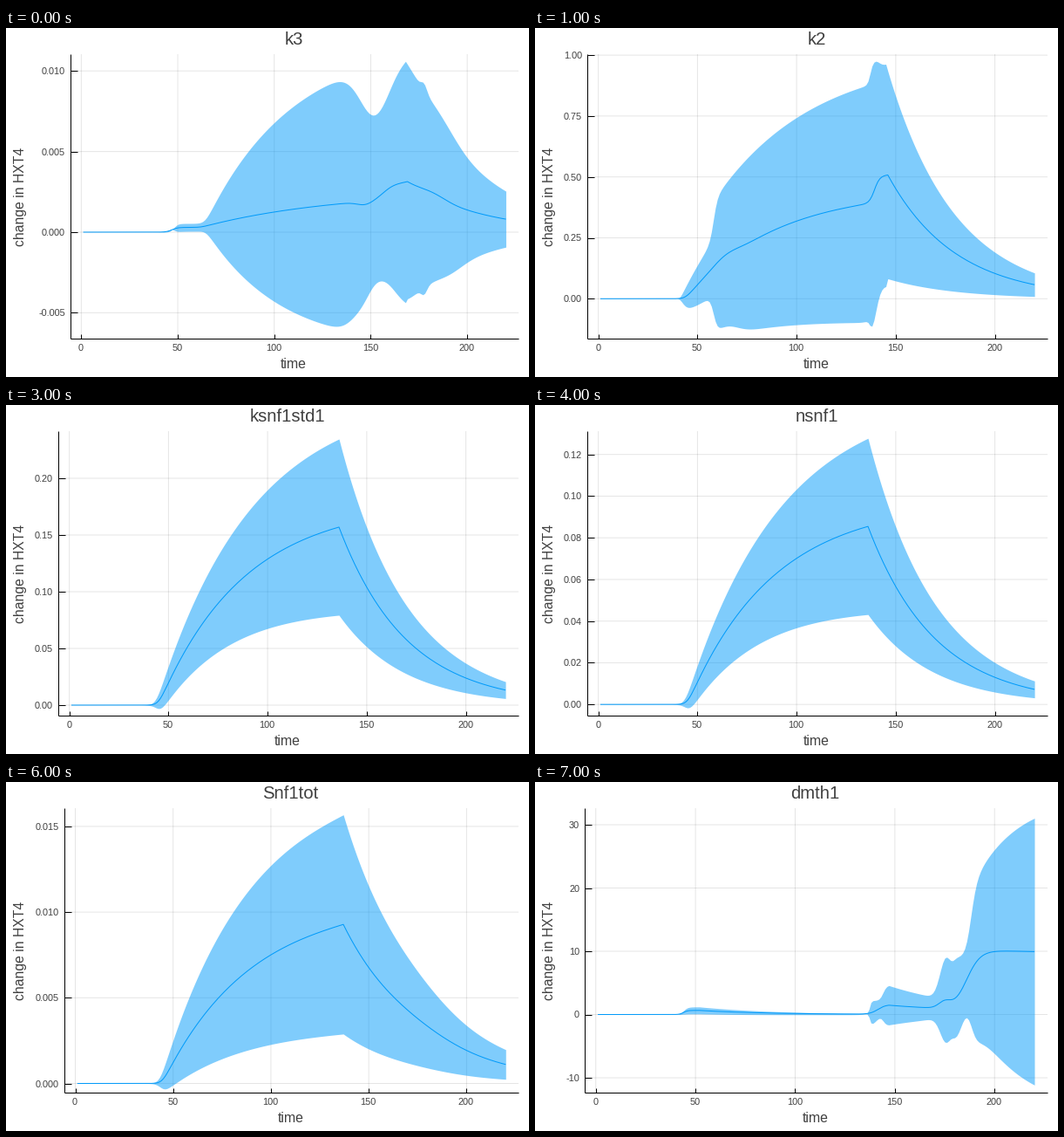
These frames come from a looping animation (600x400 px, 8 s). A matplotlib script:

```python
import numpy as np
import matplotlib.pyplot as plt
from matplotlib.animation import FuncAnimation

W, H, DPI = 600, 400, 100
RIGHT, TOP, BOTTOM = 588, 30, 356
T = np.arange(1, 221)
T_MIN, T_SPAN = -5.57, 232.14
BLUE, INK = "#009afa", "#404040"
PX = 72 / DPI

plt.rcParams["font.family"] = "Liberation Sans"
plt.rcParams["axes.unicode_minus"] = False


# Building blocks: heights in pixels above the zero line, one per time unit.

def rise(amp, start, tau, soft=1.3):
    """Saturating growth with a soft onset."""
    lag = soft * np.logaddexp(0, (T - start) / soft)
    return amp * (1 - np.exp(-lag / tau))


def step(amp, center, width):
    return amp / (1 + np.exp(np.clip((center - T) / width, -50, 50)))


def bump(amp, center, width):
    return amp * np.exp(-((T - center) / width) ** 2 / 2)


def fall(y, peak, tau):
    """Follow y up to the peak time, then decay exponentially."""
    tail = np.exp(-np.maximum(T - peak, 0) / tau)
    return y[np.minimum(T, peak) - 1] * tail


def panel(name, left, zero, gap, marks, unit, fmt, mid, top):
    ticks = [(zero - k * gap, format(k * unit, fmt)) for k in marks]
    return dict(name=name, left=left, ticks=ticks, mid=zero - mid, top=zero - top)


PULSE = (fall(rise(232, 45, 43), 136, 34), fall(rise(357, 43.5, 48), 136, 34.6))

K3 = (
    fall(step(5.5, 47, 1.5) + rise(42, 62, 70) + step(19, 157, 3), 169, 38)
    + bump(-4, 147, 4) + bump(5, 182, 7),
    fall(step(10, 48, 1) + rise(210, 64, 45), 168, 36)
    + bump(-56, 152, 7.5) + bump(14, 185, 9) + bump(8, 177.5, 1.5),
)
K2 = (
    fall(rise(125, 44, 45) + bump(5, 64, 6) + step(30, 139.3, 1.3), 146, 34),
    fall(rise(235, 41, 50, 0.5) + step(45, 58, 1) + step(18, 137, 0.6), 145, 34)
    + bump(7, 139.5, 2),
)
SNF1TOT = (
    fall(rise(208, 44.5, 45), 137, 39) + bump(6, 172, 18),
    fall(rise(352, 43, 46), 137, 40) + bump(10, 172, 18),
)
DMTH1 = (
    fall(step(4.7, 44, 1), 52, 35) + fall(step(11, 141.5, 2), 147, 60)
    + bump(7, 175, 3) + step(69, 186, 3.5),
    fall(step(8.7, 44, 1), 52, 40)
    + fall(step(15, 137.3, 0.4) + step(18, 144, 0.9), 147, 45)
    + bump(46, 175.5, 3) + step(50, 179.3, 1.2) + step(72, 188, 1.5)
    + rise(125, 186, 23),
)

PANELS = [
    panel("k3", 74, 234, 92.4, range(-1, 3), 0.005, ".3f", *K3),
    panel("k2", 60, 310.3, 69.8, range(5), 0.25, ".2f", *K2),
    panel("ksnf1", 64, 345, 73.9, range(5), 1000, "d", *PULSE),
    panel("ksnf1std1", 60, 344, 65, range(5), 0.05, ".2f", *PULSE),
    panel("nsnf1", 60, 343.2, 47.75, range(7), 0.02, ".2f", *PULSE),
    panel("nsnf2", 64, 344, 90, range(4), 500, "d", *PULSE),
    panel("Snf1tot", 67, 345.5, 98.2, range(4), 0.005, ".3f", *SNF1TOT),
    panel("dmth1", 57, 266.5, 72.5, range(-1, 4), 10, "d", *DMTH1),
]

fig = plt.figure(figsize=(W / DPI, H / DPI), dpi=DPI, facecolor="white")
ax = fig.add_axes([0, 0, 1, 1])


def to_x(t, left):
    return left + (t - T_MIN) * (RIGHT - left) / T_SPAN


def stroke(x, y, color="black", **kw):
    ax.plot(x, y, color=color, lw=PX, solid_capstyle="butt", **kw)


def label(x, y, text, size, ha="center", **kw):
    ax.text(x, y, text, size=size, color=INK, ha=ha, va="baseline", **kw)


def draw(i):
    ax.clear()
    ax.set_xlim(0, W)
    ax.set_ylim(H, 0)
    ax.axis("off")
    p = PANELS[i]
    left = p["left"]
    center = (left + RIGHT) / 2 - 1
    x_ticks = [(to_x(t, left), str(t)) for t in range(0, 201, 50)]

    for x, _ in x_ticks:
        stroke([x, x], [TOP, BOTTOM], alpha=0.1, snap=False)
    for y, _ in p["ticks"]:
        stroke([left, RIGHT], [y, y], alpha=0.1, snap=False)

    x = to_x(T, left)
    mid, top = p["mid"], p["top"]
    ax.fill_between(x, top, 2 * mid - top, color=BLUE, alpha=0.5, lw=0, zorder=3)
    stroke(x, mid, BLUE, zorder=4)

    stroke([left, RIGHT], [BOTTOM, BOTTOM], zorder=5)
    stroke([left, left], [TOP, BOTTOM], zorder=5)
    for x, text in x_ticks:
        stroke([x, x], [BOTTOM, BOTTOM - 4.9], zorder=5)
        label(x - 0.5, 370, text, 7.8)
    for y, text in p["ticks"]:
        stroke([left, left + 7.7], [y, y], zorder=5)
        label(left - 6, y + 4, text, 7.8, ha="right")

    label(center, 19, p["name"], 14.6)
    label(center, 390, "time", 11.4)
    label(21, 193, "change in HXT4", 11.3, rotation=90, rotation_mode="anchor")
    return []


anim = FuncAnimation(fig, draw, frames=len(PANELS), interval=1000,
                     init_func=lambda: draw(0), repeat=True, repeat_delay=0)
plt.show()
```
